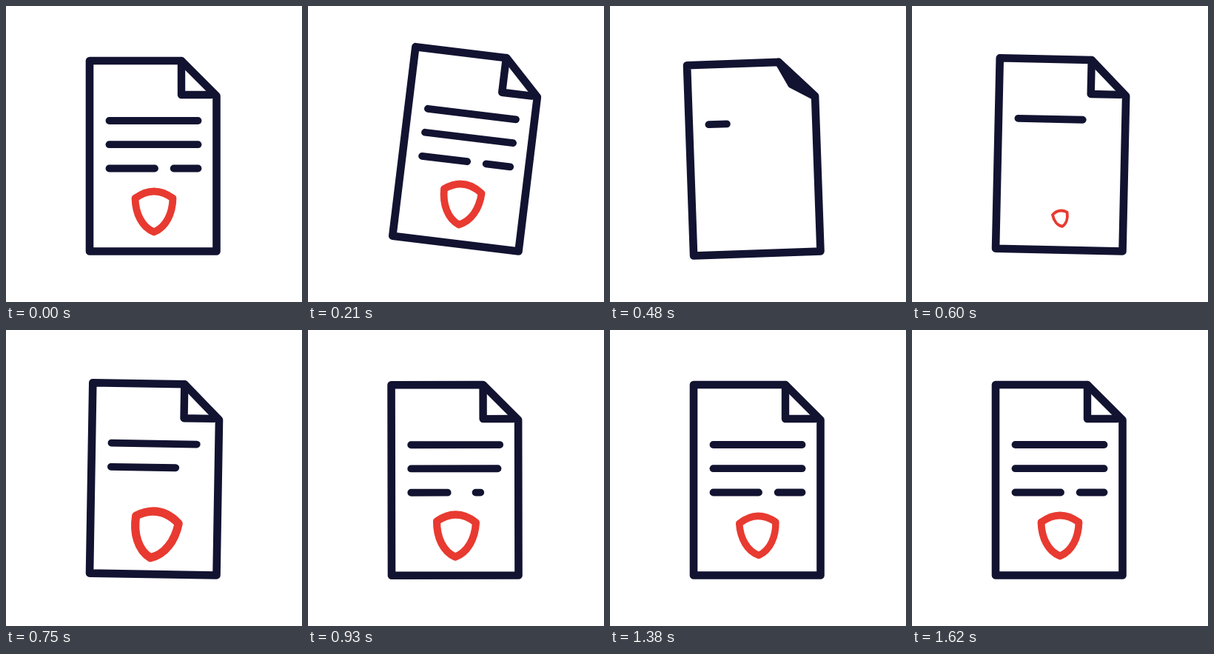
These frames come from a looping animation (400 px wide and 400 px high, 1710 ms). An HTML page with a canvas:

```html
<!DOCTYPE html>
<html>
<head>
<meta charset="utf-8">
<style>
  html, body { margin: 0; height: 100%; overflow: hidden; background: #fff; }
  canvas { display: block; width: 100vw; height: 100vh; }
</style>
</head>
<body>
<canvas id="stage" width="400" height="400"></canvas>
<script>
const ctx = document.getElementById('stage').getContext('2d');
const NAVY = '#121331', RED = '#e83a30';
const LOOP = 1710, STEP = 30, LAST = 1620, TURNED = 430;

const PIVOT = [284.5, 331.5], SEAL = [200, 277];
const page = [[113, 74], [237, 74], [284.5, 121.5], PIVOT, [113, 331.5]];
const lines = [[139.5, 259.5, 155], [139.5, 259.5, 187.2], [139.5, 201, 219.5], [226.7, 259.5, 219.5]];
const shield = new Path2D('M174.5 259.8Q200 241 225.5 259.8C225 281 216 299 200 305.5C184 299 175 281 174.5 259.8Z');

// [time, value] pairs
const swing = [[0, 0], [200, 7], [400, -3.1], [660, 1.9], [855, -0.25], [990, 0]];
const sealScale = [[495, 0], [760, 1.15], [1150, 0.87], [1500, 1]];
const sealTurn = [[495, -22.5], [760, 9.5], [1150, -9.2], [1500, 0]];
const sealDrop = [[495, 18], [760, 0]];

const mix = (a, b, p) => a + (b - a) * p;
const clamp = p => Math.max(0, Math.min(1, p));
const ease = p => (1 - Math.cos(Math.PI * clamp(p))) / 2;
const easeOut = p => 1 - (1 - clamp(p)) ** 4;
const between = (t, a, b) => ease((t - a) / (b - a));

function track(keys, t) {
  const i = keys.findIndex(k => k[0] > t);
  if (i < 0) return keys[keys.length - 1][1];
  if (i === 0) return keys[0][1];
  const [t0, a] = keys[i - 1], [t1, b] = keys[i];
  return mix(a, b, between(t, t0, t1));
}

function rotateAbout([x, y], degrees, scale = 1) {
  ctx.translate(x, y);
  ctx.rotate(degrees * Math.PI / 180);
  ctx.scale(scale, scale);
  ctx.translate(-x, -y);
}

function trace(points, closed) {
  ctx.beginPath();
  points.forEach(p => ctx.lineTo(...p));
  if (closed) ctx.closePath();
}

function stroke(color, width, path) {
  ctx.strokeStyle = color;
  ctx.lineWidth = width;
  path ? ctx.stroke(path) : ctx.stroke();
}

function drawLines(t) {
  lines.forEach(([x0, x1, y], i) => {
    const p = t < TURNED ? 1 : easeOut((t - 450 - 150 * i) / 540);
    if (p <= 0) return;
    trace([[x0, y], [mix(x0, x1, p), y]]);
    stroke(NAVY, 9.8);
  });
}

function drawSeal(t) {
  const old = t < TURNED;
  const scale = old ? 1 : track(sealScale, t);
  if (scale <= 0) return;
  ctx.save();
  if (!old) {
    ctx.translate(0, track(sealDrop, t));
    rotateAbout(SEAL, track(sealTurn, t), scale);
  }
  stroke(RED, 9.8, shield);
  ctx.restore();
}

// The fold sweeps across the sheet, then a new one opens at the corner.
function drawFold(t) {
  let top = [237, 74], corner, end;
  if (t < TURNED) {
    const p = between(t, 200, TURNED);
    const x = mix(237, 113, p), y = mix(120, 331.5, p);
    top = [x, 74];
    corner = [x, y];
    end = [277, y];
  } else {
    const p = between(t, TURNED, 560);
    corner = [mix(261, 237, p), mix(97.5, 120, p)];
    end = [mix(284.5, 277, p), mix(121.5, 120, p)];
  }
  trace([top, corner, end, page[2], page[1]], true);
  ctx.fill();
  trace([top, corner, end]);
  stroke(NAVY, 10.4);
}

function draw(t) {
  ctx.fillStyle = '#fff';
  ctx.lineCap = ctx.lineJoin = 'round';
  ctx.fillRect(0, 0, 400, 400);
  ctx.save();
  rotateAbout(PIVOT, track(swing, t));
  drawLines(t);
  drawSeal(t);
  drawFold(t);
  trace(page, true);
  stroke(NAVY, 10.6);
  ctx.restore();
}

const start = performance.now();
function tick() {
  const t = (performance.now() - start) % LOOP;
  draw(Math.min(LAST, Math.floor(t / STEP) * STEP));
  requestAnimationFrame(tick);
}
tick();
</script>
</body>
</html>
```
